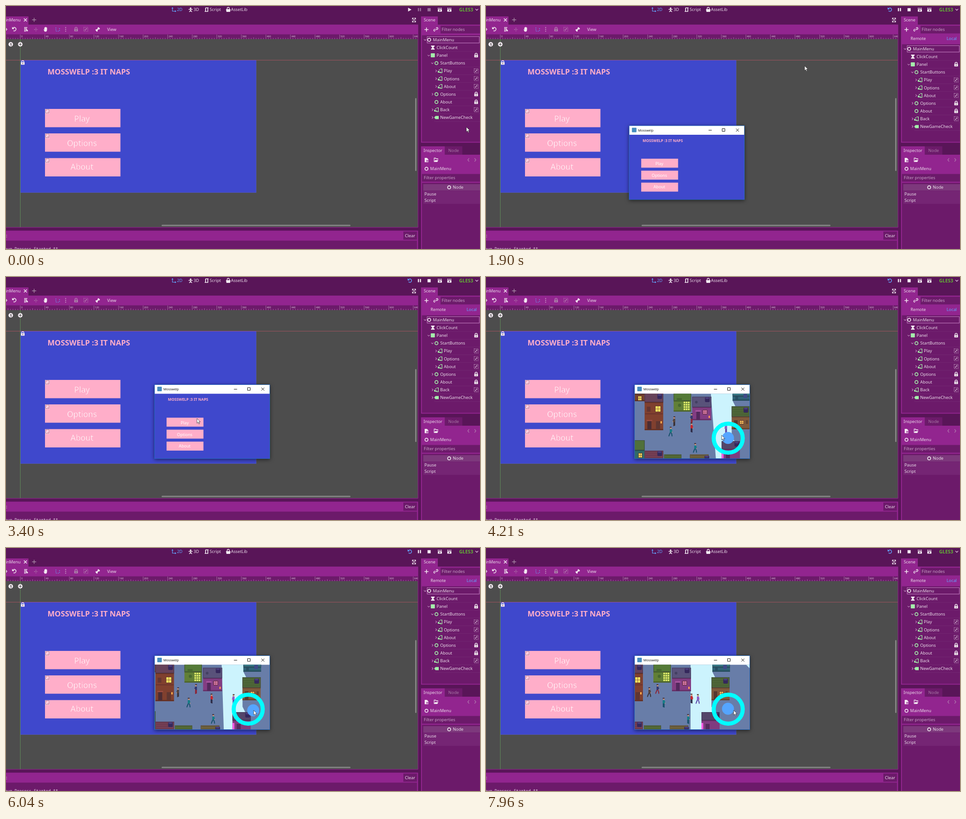
Recreate the animation shown at these times as an HTML page. Size 1045 px wide and 536 px high, loop 8 s.

```html
<!DOCTYPE html>
<html lang="en">
<head>
<meta charset="utf-8">
<title>Editor play test</title>
<style>
  html, body { margin: 0; width: 100%; height: 100%; overflow: hidden; background: #591558; }
  svg { display: block; width: 100%; height: 100%; }
  text { font-family: 'Noto Sans', sans-serif; font-size: 9.25px; fill: #eadde9; white-space: pre; }
  #win { filter: drop-shadow(0 2px 4px rgba(0, 0, 0, .55)); }
</style>
</head>
<body>
<svg id="stage" viewBox="0 0 1045 536" preserveAspectRatio="none"></svg>
<script>
const BRIGHT = '#92258f', MID = '#6c1a6a', DARK = '#591558', BLUE = '#3f48cc', PINK = '#ffaec9';
const WHITE = '#f3eaf2', DIM = '#b07aae', GREEN = '#a5efac', SKY = '#62a6ff';
const GAME = 'Mosswelp', SLOGAN = 'MOSSWELP :3 IT NAPS';

const rect = (x, y, w, h, fill, more = '') =>
  `<rect x="${x}" y="${y}" width="${w}" height="${h}" fill="${fill}" ${more}/>`;
const text = (x, y, str, more = '') => `<text x="${x}" y="${y}" ${more}>${str}</text>`;
const line = (d, color = WHITE, width = 1.2, more = '') =>
  `<path d="${d}" fill="none" stroke="${color}" stroke-width="${width}" ${more}/>`;
const shape = (d, fill = WHITE, more = '') => `<path d="${d}" fill="${fill}" ${more}/>`;
const disc = (x, y, r, fill, more = '') => `<circle cx="${x}" cy="${y}" r="${r}" fill="${fill}" ${more}/>`;
const ring = (x, y, color) => disc(x, y, 3.4, 'none', `stroke="${color}" stroke-width="1.7"`);
const group = (id, body, more = '') => `<g id="${id}" ${more}>${body}</g>`;
const range = n => [...Array(n).keys()];

// Small icons
const chevron = (x, y, open) =>
  line(open ? `M${x - 2.5} ${y - 1}l2.5 2.5 2.5-2.5` : `M${x - 1} ${y - 2.5}l2.5 2.5-2.5 2.5`, '#c48fc2', 1.1);
const lock = (x, y, color = WHITE) => rect(x - 4, y - 1, 8, 5.5, color) +
  line(`M${x - 2.5} ${y}v-2a2.5 2.5 0 0 1 5 0v2`, color, 1.4) + rect(x - .6, y + .5, 1.2, 2.5, '#53304f');
const grouped = (x, y, color = '#c19dc0') =>
  line(`M${x - 4.5} ${y - 4.5}h9v9h-9z`, color, 1.1, 'stroke-dasharray="2 1.5"') +
  rect(x - 2.5, y, 2.5, 2.5, color) + rect(x, y - 2.5, 2.5, 2.5, color);
const buttonIcon = (x, y) =>
  line(`M${x} ${y - 4.2}h4.3v8.4h-4.3`, GREEN, 1.3) + disc(x - 1.5, y - 2, 1.2, GREEN) +
  shape(`M${x - 5} ${y + 4}v-4h2l1.500 2h3v2z`, GREEN);
const hourglass = (x, y) => shape(`M${x - 4} ${y - 4.5}h8v1.5l-2.8 3 2.8 3v1.5h-8v-1.5l2.8-3-2.8-3z`);
const tag = (x, y) => shape(`M${x - 5} ${y}l3-3.5h7v7h-7z`, GREEN);
const clapper = (x, y) => rect(x - 4.5, y - 1, 9, 5.5, WHITE) +
  line(`M${x - 4.5} ${y - 3}h9`, WHITE, 2, 'stroke-dasharray="2 1.3"') + shape(`M${x - 1} ${y}l3 1.7-3 1.7z`, DARK);

function topBar() {
  return line('M367 4v7.5h7M365.5 5.5l1.5-2 1.5 2M372.5 10l2 1.5-2 1.5', SKY) +
    text(377, 11.3, '2D', `style="fill:${SKY}"`) +
    disc(407, 5, 1.8, WHITE) + line('M402.5 7.5h9M407 7v3l-3 3M407 10l3 3', WHITE, 1.6) + text(413.5, 11.3, '3D') +
    line('M440 4h6.5M440 4v8h-2h7v-8', WHITE, 1.7) + text(449, 11.3, 'Script') +
    shape('M485 7h10l-1 6h-8z') + line('M487.5 8v-2.5a2.500 2.500 0 0 1 5 0v2.500', WHITE, 1.3) + text(496, 11.3, 'AssetLib') +
    group('play', shape('M886.5 3.8l7.5 4.2-7.5 4.2z', 'currentColor')) +
    group('reload', line('M887.5 5.5a3.8 3.8 0 1 1 0 5', SKY, 1.5) + shape('M885.5 3v4.5h4.5z', SKY)) +
    group('controls', rect(908, 4.5, 2.5, 7, 'currentColor') + rect(912.5, 4.5, 2.5, 7, 'currentColor') +
      rect(929.3, 4.7, 7, 7, 'currentColor')) +
    clapper(956.5, 8) + clapper(977.5, 8) +
    text(999, 11.6, 'GLES3', 'style="fill:#62b336;font-weight:600;font-size:10.4px"') +
    line('M1035 6.5l3 3 3-3', '#d9bfd8', 1.3);
}

function toolBar() {
  return rect(0, 23, 49.5, 19, BRIGHT) + text(-1, 34, 'inMenu') + line('M39.5 27.5l6.5 6.5M46 27.5l-6.5 6.5', WHITE, 1.5) +
    line('M62 26v9M57.5 30.5h9', '#a98aa6', 1.3) +
    line('M896 30v-3.5h3M903 30v-3.5h-3M896 32v3.5h3M903 32v3.5h-3M896.5 27l6 8M902.5 27l-6 8', WHITE, 1.1) +
    rect(0, 41, 908, 22, BRIGHT) + line('M0 49l2 2.5-2 2.5', WHITE, 1.3) +
    line('M15.5 48.5a3.8 3.8 0 1 1 1 6', WHITE, 1.5) + shape('M13.5 46v5h5z') +
    line('M40 47.5h7M40 50.3h6M40 53h5M40 55.5h4', WHITE, 1.4) + shape('M45 50l4 5-4 1z') +
    line('M62 52h8M66 48v8', DIM, 1.4, 'stroke-dasharray="2 1.5"') +
    shape('M82.5 51l2 1.5v-5h1.5v3v-4h1.5v4v-4h1.5v4v-3h1.5v6l-1.5 3h-4z') +
    line('M110 47.5v8M118 49v6M110 55.5h8', SKY, 1.2, 'stroke-dasharray="2 2"') +
    range(3).map(i => disc(131.5, 47.5 + i * 4, 1, '#d6b8d5')).join('') +
    lock(154.5, 51.5, DIM) + grouped(176, 51.5, DIM) +
    line('M199.5 54l5-5', WHITE, 2.5) +
    [[199, 53], [200.5, 54.7], [203.7, 48.5], [205.3, 50]].map(([x, y]) => disc(x, y, 1.7, WHITE)).join('') +
    text(223, 54.8, 'View');
}

function ruler() {
  const unit = 54.15, zero = 31.5;
  let out = rect(0, 62.5, 908, 10.5, MID);
  for (let i = -5; i < 162; i++)
    out += line(`M${(zero + i * unit / 10).toFixed(1)} ${i % 10 ? (i % 5 ? 70.5 : 69) : 63}V73`, '#b98fb7', .7);
  return out + range(17).map(i =>
    text(zero + i * unit + 2, 69.3, i * 40, 'style="font-size:5.4px;fill:#dcc4db"')).join('');
}

const buttons = [['Play', 227, 254.8], ['Options', 281, 309], ['About', 335.5, 360.6]];

function viewport() {
  return rect(0, 73, 908, 415, '#4d4d4d') + rect(32, 119, 519.5, 292.5, BLUE) +
    line('M32 411.5H551.5V120', '#5558c0', .8) +
    line('M0 119.5H908', '#e0566c', 1, 'opacity=".55"') + line('M31.5 73V488', '#6fc265', 1, 'opacity=".55"') +
    disc(10.5, 84.5, 5, WHITE) + text(8.4, 87.5, '1', 'style="font-size:8px;font-weight:700;fill:#333"') +
    disc(31.5, 84.5, 5, WHITE) + line('M28.5 84.5h6M31.5 81.5v6', '#444', 1.2) + lock(37, 125) +
    text(91.5, 151.3, SLOGAN, `style="font-size:16.8px;font-weight:700;fill:${PINK}"`) +
    buttons.map(([name, y, base]) => rect(86, y, 166.3, 40.4, PINK) +
      text(167.5, base, name, `text-anchor="middle" stroke="${PINK}" stroke-width=".6" style="font-size:17.8px;font-weight:300;fill:#fff"`) +
      grouped(91, y + 5.5, '#f3f0f3') + line(`M87 ${y + 1}h8v8h-8z`, '#80717d', .6)).join('') +
    rect(902, 203, 3, 161, '#858585', 'rx="1.5"') + rect(343, 482.5, 416.5, 3, '#858585', 'rx="1.5"') +
    line('M0 488.3H908.3V41', BRIGHT, 1) + rect(909, 41, 6, 495, DARK);
}

function output() {
  return rect(0, 489, 915, 47, DARK) + rect(0, 495.5, 908.5, 41, BRIGHT) +
    text(-3, 509.5, 't:') + rect(876, 497.5, 30, 18, MID) + text(879.5, 509.8, 'Clear') +
    rect(0, 517.5, 906, 19, MID) +
    text(114.5, 538.6, 'bug Process Started **', 'text-anchor="end" style="font-family:\'Noto Sans Mono\',monospace;font-size:8.9px"');
}

// depth, name, icon, arrow state, right-hand mark
const nodes = [
  [0, 'MainMenu', (x, y) => ring(x, y, WHITE), 'open'],
  [1, 'ClickCount', hourglass],
  [1, 'Panel', (x, y) => rect(x - 4.5, y - 4.5, 9, 9, GREEN, 'rx="1"'), 'open', lock],
  [2, 'StartButtons', (x, y) => ring(x, y, GREEN), 'open'],
  [3, 'Play', buttonIcon, 'shut', grouped],
  [3, 'Options', buttonIcon, 'shut', grouped],
  [3, 'About', buttonIcon, 'shut', grouped],
  [2, 'Options', (x, y) => ring(x, y, GREEN), 'shut', lock],
  [2, 'About', (x, y) => ring(x, y, GREEN), '', lock],
  [2, 'Back', buttonIcon, 'shut', grouped],
  [2, 'NewGameCheck', tag, 'shut']
];

function sceneDock() {
  const rows = nodes.map(([depth, name, icon, arrow, mark], i) => {
    const x = 933 + depth * 8, y = 74.5 + i * 17.15;
    return line(`M${x - 5} ${y + 8.5}H1045`, '#782d76', .7) + (arrow ? chevron(x - 9, y, arrow === 'open') : '') +
      icon(x, y) + text(x + 8.3, y + 3.3, name) + (mark ? mark(1036.5, y) : '');
  }).join('');
  return rect(915, 23, 37, 19, BRIGHT) + text(921, 34.3, 'Scene') + rect(915, 41, 130, 260.5, BRIGHT) +
    line('M927 47.5v9M922.5 52h9', WHITE, 1.6) +
    line('M946 54.5l-1.5 1a2 2 0 0 1-1-3l2-2M948 49l2-1.5a2 2 0 0 1 2 3l-2 2M946.5 53.5l3-3', WHITE, 1.4) +
    rect(958, 43.5, 87, 17, MID) + text(960.5, 55.3, 'Filter nodes', 'style="fill:#c7a0c6"') +
    group('remote', text(936, 75.3, 'Remote') + text(1015.5, 75.3, 'Local', `style="fill:${SKY}"`)) +
    group('treeBack', rect(917, 64.5, 128, 235, MID)) +
    group('tree', rect(928.5, 67.5, 115, 14, 'none', 'stroke="#c57cc2" stroke-width="1"') + rows);
}

function inspector() {
  return rect(915, 309.5, 52.5, 19, BRIGHT) + rect(968, 309.5, 38, 18.5, MID) +
    text(920.5, 321.5, 'Inspector') + text(975, 321.5, 'Node', 'style="fill:#a777a5"') +
    rect(915, 328, 130, 208, BRIGHT) +
    shape('M923 335h5l3 3v6.5h-8z') + line('M928.5 339v5M926 341.5h5', BRIGHT, 1.2) +
    line('M944 344v-8.5h3l1 1.5h4v2', WHITE, 1.3) + shape('M944 344l2-4h7l-2 4z') +
    line('M1021 336l-3 3.5 3 3.5M1033 336l3 3.5-3 3.5', DIM, 1.2) +
    ring(927, 359, WHITE) + text(935, 362.4, 'MainMenu') +
    rect(917, 370.5, 128, 17, MID) + text(921, 382.3, 'Filter properties', 'style="fill:#c7a0c6"') +
    rect(917, 390, 128, 146, MID) + rect(920, 393, 125, 14, '#7d387c') +
    ring(977, 400, WHITE) + text(985, 403.4, 'Node') + rect(920, 407.5, 125, 29, '#752574') +
    text(922.5, 417.5, 'Pause') + text(922.5, 432.3, 'Script');
}

// Town
const tank = (x, y) => rect(x - 5, y - 5, 10.5, 11, '#35285c', 'rx="2.5"') + rect(x - 4, y - 5, 8, 4, '#4b3d7c', 'rx="2"');
function house(x, y, w, h, roof, roofH, wall, stripes) {
  const slats = stripes ? range(Math.floor(roofH / 4)).map(i => line(`M${x + 2} ${y + 3 + i * 4}h${w - 4}`, stripes, 1.5)).join('') : '';
  return rect(x, y, w, h, wall) + rect(x, y, w, roofH, roof) + slats +
    rect(x + .5, y + .5, w - 1, roofH - 1, 'none', 'stroke="#2b2440" stroke-opacity=".5"') +
    rect(x, y + roofH, w, 2, '#0003') + rect(x, y + h - 3, w, 3, '#0003');
}
const pane = (x, y, w, h, color = '#f7e35f') => rect(x - 1, y - 1, w + 2, h + 2, '#5a302c') + rect(x, y, w, h, color) +
  line(`M${x + w / 2} ${y}v${h}M${x} ${y + h / 2}h${w}`, '#8a5a38', .9);

function town() {
  return house(306, 240, 37, 34, '#55455c', 18, '#74402f') + pane(329, 263, 7, 9) +
    house(343, 240, 41, 98, '#664259', 36, '#80402f') + tank(376, 263) +
    rect(344, 301, 39, 1.5, '#632d2b') + pane(367, 285, 11, 12) + rect(348, 286, 8, 11, '#643531') +
    rect(347, 315, 13, 3, '#984a40') + rect(349, 318, 9, 18, '#4b2c33') + rect(368, 318, 9, 17, '#5f3631') +
    rect(378, 318, 3, 5, '#ffb04f') +
    house(407, 240, 38.5, 57, '#547a37', 33, '#617f37') + rect(414, 267, 11, 8, '#47672f') + disc(420, 283, 3.5, '#47682f') +
    range(12).map(i => rect(429 + i % 3 * 4.7, 275 + Math.floor(i / 3) * 5, 3.6, 3.6, '#e3ef6b')).join('') +
    house(448, 264, 42, 52, '#59527a', 23, '#833d83') + tank(481, 270) + disc(457, 276, 3, '#434062') +
    rect(455, 294, 12, 3, '#a8569f') + rect(457, 297, 8, 18, '#53285d') + pane(472, 294, 8, 8, '#dc74ba') + rect(484, 306, 3, 5, '#ff9a56') +
    house(537, 245, 39, 28, '#377a85', 17, '#2f6275') + rect(543, 264, 6, 7, '#274e62') + rect(561, 258, 8, 9, '#3e4a88') +
    house(535, 285, 40, 51, '#526b3b', 23, '#805a3c', '#41592f') + tank(566, 293) + pane(553, 317, 8, 7, '#f3bd5a') +
    rect(540, 316, 8, 19, '#55392f') + rect(566, 316, 5, 8, '#614334') +
    house(513, 362, 40, 50, '#54466a', 18, '#7f3c80') + tank(546, 368) + rect(513, 386, 4, 15, '#ff5be6') + rect(522, 388, 9, 13, '#552a5c') +
    house(306, 360, 37, 50, '#50703b', 22, '#316a68') + pane(330, 389, 7, 9) +
    house(343, 383, 41, 30, '#7c4256', 18, '#80402f', '#60334a') + tank(376, 389) +
    house(386, 391.5, 38, 20, '#5a7038', 14, '#617f37', '#435a2d') +
    house(443, 391.5, 41, 20, '#786b40', 14, '#805a3c', '#564a33') + tank(480, 399) +
    shape('M611 257h14v14z', '#ccf3fd');
}

// Townsfolk: clothes, height on the street, and [time, x] along it
const folk = [
  { coat: '#55453f', legs: '#3b3236', y: 318, path: [[3690, 413], [5090, 401], [6750, 387], [7960, 398]] },
  { coat: '#34386f', legs: '#8b2638', y: 311, path: [[3690, 451], [5090, 440], [7060, 424.5], [7960, 416]] },
  { coat: '#157c86', legs: '#17506b', y: 341, path: [[3690, 396], [5090, 408], [7060, 425.5], [7960, 429.5]] },
  { coat: '#157c86', legs: '#17506b', y: 377, path: [[3690, 450], [5090, 462], [7060, 479.5], [7960, 483.5]] },
  { coat: '#8b5bc4', legs: '#5c48a8', y: 333, path: [[3690, 525], [5090, 519], [7060, 511.5], [7960, 505]] },
  { coat: '#c3262f', legs: '#2d2c48', y: 332, player: true }
];
const person = ({ coat, legs }) =>
  rect(-2, -10.5, 4, 2, '#3a2428') + rect(-1, -8.5, 3, 3, '#d79a78') + rect(-2, -5.5, 4.5, 7.5, coat) +
  rect(2, -3, 1.3, 4, coat) + rect(2.5, .5, 1.5, 1.5, '#d79a78') +
  `<g class="stride">${line('M-.8 2l-2 4.5-1 3h-1M1 2l1.5 4 .5 3.5h1', legs, 2.1)}</g>` +
  `<g class="stand">${line('M-.8 2v8M1.2 2v8h1', legs, 2)}</g>`;

function gameWindow() {
  const menu = rect(327.5, 257.5, 254, 143, BLUE) +
    text(357, 273.3, SLOGAN, `style="font-size:8.2px;font-weight:700;fill:${PINK}"`) +
    buttons.map(([name], i) => rect(354, 310.3 + i * 26.4, 81.3, 19.8, PINK) +
      text(394, [324.5, 350.5, 375.8][i], name, 'text-anchor="middle" style="font-size:9.1px;fill:#fff"')).join('');
  const game = rect(327, 257, 255, 144, '#687da8') +
    group('world', shape('', '#ccf3fd', 'id="lit"') + town() + folk.map((f, i) => group('p' + i, person(f))).join('')) +
    disc(534, 355.5, 32, 'none', 'stroke="#00ffff" stroke-width="9"') + disc(0, 0, 13.2, '#55a5ff', 'id="knob"');
  return group('win', rect(327.5, 237.5, 254, 163, '#fff') +
    rect(333.5, 242, 10, 10, '#478cbf', 'rx="1"') +
    text(347, 250.2, GAME, `style="font-family:'Open Sans',sans-serif;font-size:7.3px;fill:#111"`) +
    line('M502.5 247.5h7M532.5 244h6v6h-6zM563 244l6.5 6.5M569.5 244l-6.5 6.5', '#111', 1) +
    group('menu', menu) + group('game', game, 'clip-path="url(#pane)"') +
    rect(327.5, 237.5, 254, 163, 'none', 'stroke="#1d68c4" stroke-width=".9"'));
}

const dialog = () => group('dialog', rect(266.5, 297.5, 341.5, 62.5, BRIGHT, 'stroke="#2a092a" stroke-width="1.8"') +
  text(275, 315, 'Saving Scene') + rect(272.5, 323.5, 329.5, 10.5, 'none', 'stroke="#d79bd5" stroke-width="1"') +
  text(437, 332, '0%', 'text-anchor="middle"') + text(275, 349.3, 'Analyzing'));

const stage = document.getElementById('stage');
stage.innerHTML = '<clipPath id="pane"><rect x="328" y="257.5" width="253" height="143"/></clipPath>' +
  rect(0, 0, 1045, 536, DARK) + topBar() + toolBar() + ruler() + viewport() + output() + sceneDock() + inspector() +
  dialog() + gameWindow() +
  group('cursor', shape('M0 0v10.5l2.5-2.3 1.7 4 1.7-.8-1.7-3.8h3.3z', '#fff', 'stroke="#222" stroke-width=".7"'));

const $ = id => document.getElementById(id);
const show = (id, on) => $(id).style.display = on ? '' : 'none';
const move = (id, x, y, more = '') => $(id).setAttribute('transform', `translate(${x} ${y})${more}`);

// Piecewise linear lookup of [time, ...values]
function at(keys, t) {
  const i = keys.findIndex(k => k[0] > t);
  if (i === 0) return keys[0].slice(1);
  if (i < 0) return keys[keys.length - 1].slice(1);
  const a = keys[i - 1], b = keys[i], f = (t - a[0]) / (b[0] - a[0]);
  return a.slice(1).map((v, n) => v + (b[n + 1] - v) * f);
}

const LOOP = 8000;
// first change, last change, number of changes
const bursts = [[70, 700, 10], [860, 860, 1], [1380, 1540, 3], [1690, 2200, 8], [2340, 2590, 5], [2820, 3400, 9],
  [3690, 4430, 11], [4500, 5230, 11], [5310, 6100, 12], [6180, 6920, 11], [7000, 7800, 12], [7880, 7960, 2]];
const ticks = [0, ...bursts.flatMap(([a, b, n]) => range(n).map(i => a + (n > 1 ? (b - a) * i / (n - 1) : 0)))];

const cursorPath = [[0, 1015, 267], [140, 1019, 254], [350, 962, 140], [560, 898, 25], [700, 888, 11], [860, 888, 10],
  [1620, 888, 10], [1850, 690, 140], [2060, 420, 290], [2200, 358.5, 310], [2270, 358.5, 310], [2590, 421, 272],
  [2750, 421, 272], [3110, 433, 245.5], [3400, 421, 312], [3690, 421, 312], [4280, 533, 354], [4500, 534, 355],
  [4720, 546, 358]];
const windowPath = [[2750, -11.8, 26.5], [3110, 0, 0]];
const cameraPath = [[4620, -6.7], [5090, 0], [7060, 28.5], [7730, 38]];
const knobPath = [[4500, 533.5, 355], [4720, 545, 358], [7730, 545, 358], [7800, 533.5, 354.5]];

function draw(t) {
  const running = t >= 1830, playing = t >= 3690;
  show('dialog', t >= 1380 && t < 1540);
  show('play', t < 1540);
  show('reload', t >= 1540);
  $('play').style.color = t >= 1380 ? SKY : WHITE;
  $('controls').style.color = running ? WHITE : '#99709a';
  show('remote', running);
  $('treeBack').firstChild.setAttribute('y', running ? 84.5 : 64.5);
  $('treeBack').firstChild.setAttribute('height', running ? 215 : 235);
  move('tree', 0, running ? 20 : 0);
  show('win', t >= 1690);
  show('menu', !playing);
  show('game', playing);
  move('win', ...at(windowPath, t));
  move('cursor', ...at(cursorPath, t));
  if (!playing) return;

  const [cam] = at(cameraPath, t);
  const foot = 490 + Math.max(-1, 8 - 9 * cam / 28.5);
  $('lit').setAttribute('d', `M489 257H537V273L543 285 535 287V350L541 362H513V401H${foot}z`);
  move('world', -cam, 0);
  move('knob', ...at(knobPath, t));
  folk.forEach((f, i) => {
    const x = f.player ? 453 + cam : at(f.path, t)[0];
    const left = !f.player && at(f.path, t + 60)[0] < x;
    const walking = !f.player || (t > 4620 && t < 7730);
    const stride = walking && Math.floor(t / 220 + i / 2) % 2 === 0;
    move('p' + i, x, f.y, left ? ' scale(-1 1)' : '');
    $('p' + i).querySelector('.stride').style.display = stride ? '' : 'none';
    $('p' + i).querySelector('.stand').style.display = stride ? 'none' : '';
  });
}

const start = performance.now();
let shown = -1;
function frame(now) {
  const t = Math.max(0, now - start) % LOOP;
  const tick = ticks.filter(k => k <= t + .5).pop();
  if (tick !== shown) draw(shown = tick);
  requestAnimationFrame(frame);
}
draw(0);
requestAnimationFrame(frame);
</script>
</body>
</html>
```
